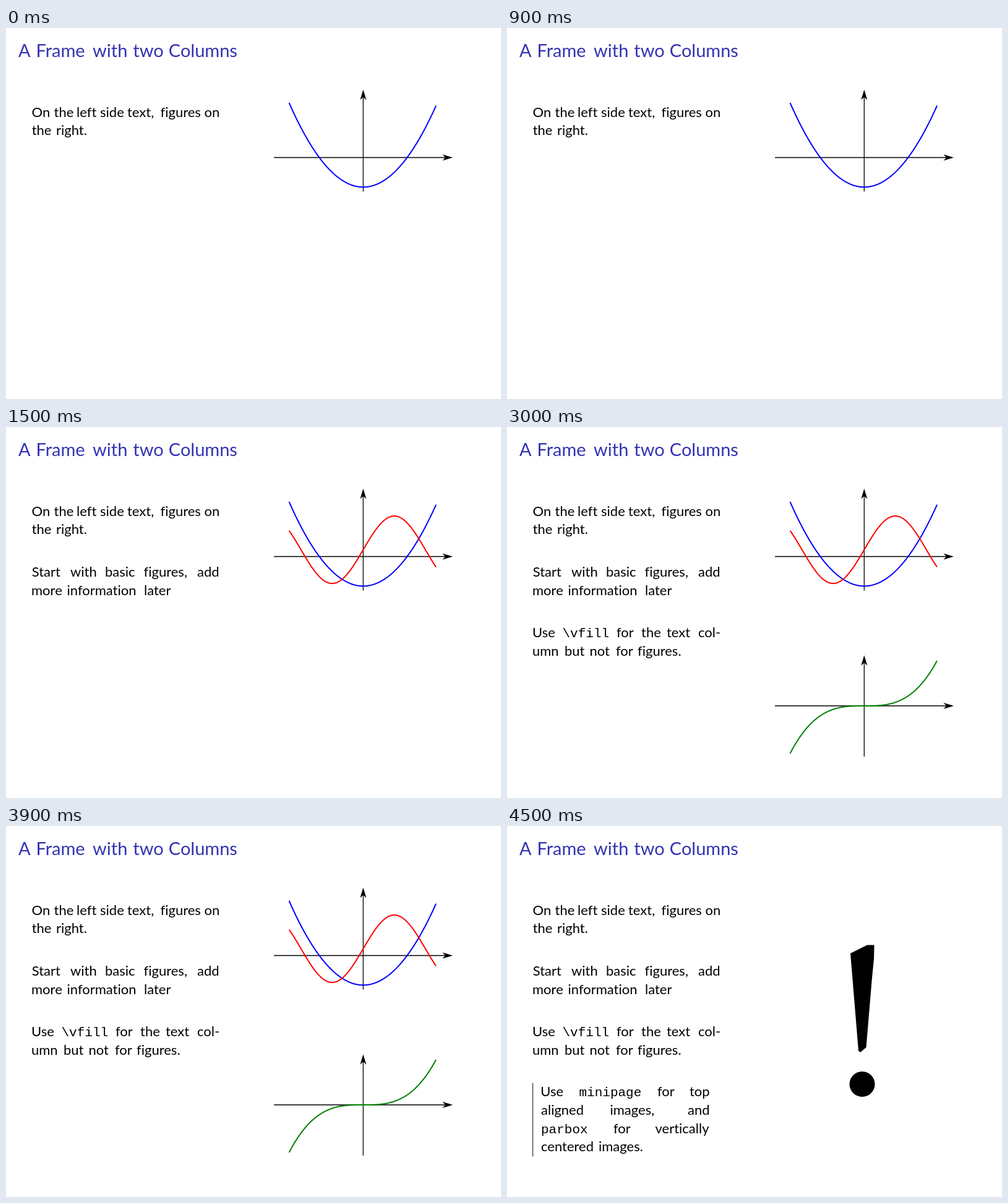
Animation, 800 px wide and 600 px high, one loop 6000 ms. Source, as an HTML page:

```html
<!DOCTYPE html>
<html lang="en">
<head>
<meta charset="utf-8">
<title>Two columns</title>
<style>
  html, body { margin: 0; width: 100%; height: 100%; overflow: hidden; background: #fff; }
  svg { display: block; width: 800px; height: 600px; }
  text { font: 22px Lato, sans-serif; font-variant-ligatures: none; white-space: pre; }
  .title { font-size: 29px; fill: #3333b2; }
  .mono { font: 21px "Liberation Mono", monospace; }
  .axis { stroke: #000; stroke-width: 1.3; }
  .curve { fill: none; stroke-width: 2; }
</style>
</head>
<body>
<svg id="stage" viewBox="0 0 800 600"></svg>
<script>
const STEP = 1500, STEPS = 4;
const CX = 577.3, LEFT = 457.5, RIGHT = 695;
const stage = document.getElementById("stage");
const parts = [];

function add(parent, tag, attrs, text = "") {
  const el = document.createElementNS("http://www.w3.org/2000/svg", tag);
  for (const key in attrs) el.setAttribute(key, attrs[key]);
  el.textContent = text;
  return parent.appendChild(el);
}

// A group that is visible from step `first` up to and including step `last`
function part(first, last = STEPS - 1) {
  const el = add(stage, "g", {});
  parts.push({ el, first, last });
  return el;
}

// Words set at their own x; a leading "`" selects the monospaced font
function line(parent, y, words, xs, cls = "") {
  words.split(" ").forEach((word, i) => {
    const mono = word[0] === "`";
    add(parent, "text", { x: xs[i], y, class: mono ? "mono" : cls }, mono ? word.slice(1) : word);
  });
}

function axes(parent, top, mid, bottom) {
  const head = "M0 0L-16.5 -5L-12 0L-16.5 5Z";
  add(parent, "path", { class: "axis", d: `M433 ${mid}H712M${CX} ${bottom}V${top + 10}` });
  add(parent, "path", { d: head, transform: `translate(722 ${mid})` });
  add(parent, "path", { d: head, transform: `translate(${CX} ${top}) rotate(-90)` });
}

function curve(parent, stroke, fn) {
  const points = [];
  for (let x = LEFT; x <= RIGHT; x += 0.5) points.push(x + "," + fn(x - CX).toFixed(2));
  add(parent, "polyline", { class: "curve", stroke, points: points.join(" ") });
}

const base = part(0);
line(base, 47, "A Frame with two Columns", [20, 48.5, 140, 205.3, 262.8], "title");
line(base, 143.5, "On the left side text, figures on", [41.5, 77.5, 114, 152, 196, 249.5, 320.5]);
line(base, 173.3, "the right.", [41.7, 81]);

const basics = part(1);
line(basics, 241.8, "Start with basic figures, add", [41.7, 104, 160, 222.5, 309]);
line(basics, 271.6, "more information later", [41, 98.5, 223]);

const fill = part(2);
line(fill, 340.4, "Use `\\vfill for the text col-", [41, 89.5, 177, 217, 258, 309]);
line(fill, 370.2, "umn but not for figures.", [41, 93, 133.5, 176, 211]);

const boxed = part(3);
add(boxed, "path", { d: "M41.7 415.5V534.5", stroke: "#000" });
line(boxed, 437, "Use `minipage for top", [54.3, 116.5, 243, 295]);
line(boxed, 466.8, "aligned images, and", [55, 166.5, 292]);
line(boxed, 496.6, "`parbox for vertically", [55, 172, 239.5]);
line(boxed, 526.4, "centered images.", [55, 148]);

const parabola = part(0, 2);
axes(parabola, 99.8, 209.5, 264.5);
curve(parabola, "#00f", x => 257.3 - 0.0095 * x * x);
curve(part(1, 2), "#f00", x => 198.5 - 54.5 * Math.sin(Math.PI * x / 100.5));

const cubic = part(2, 2);
axes(cubic, 369.3, 451, 533);
curve(cubic, "#008000", x => 451 - 4.48e-5 * x ** 3);

const mark = part(3);
add(mark, "path", { d: "M555 206L582 192.4H593.5L593 215L590 245L580.5 358L571 366L568 363.5Z" });
add(mark, "circle", { cx: 574, cy: 417.4, r: 20.5 });

function draw(now) {
  const step = Math.floor(now / STEP) % STEPS;
  for (const { el, first, last } of parts) {
    el.style.display = step >= first && step <= last ? "" : "none";
  }
}

const start = performance.now();
function tick() {
  draw(performance.now() - start);
  requestAnimationFrame(tick);
}
tick();
</script>
</body>
</html>
```
